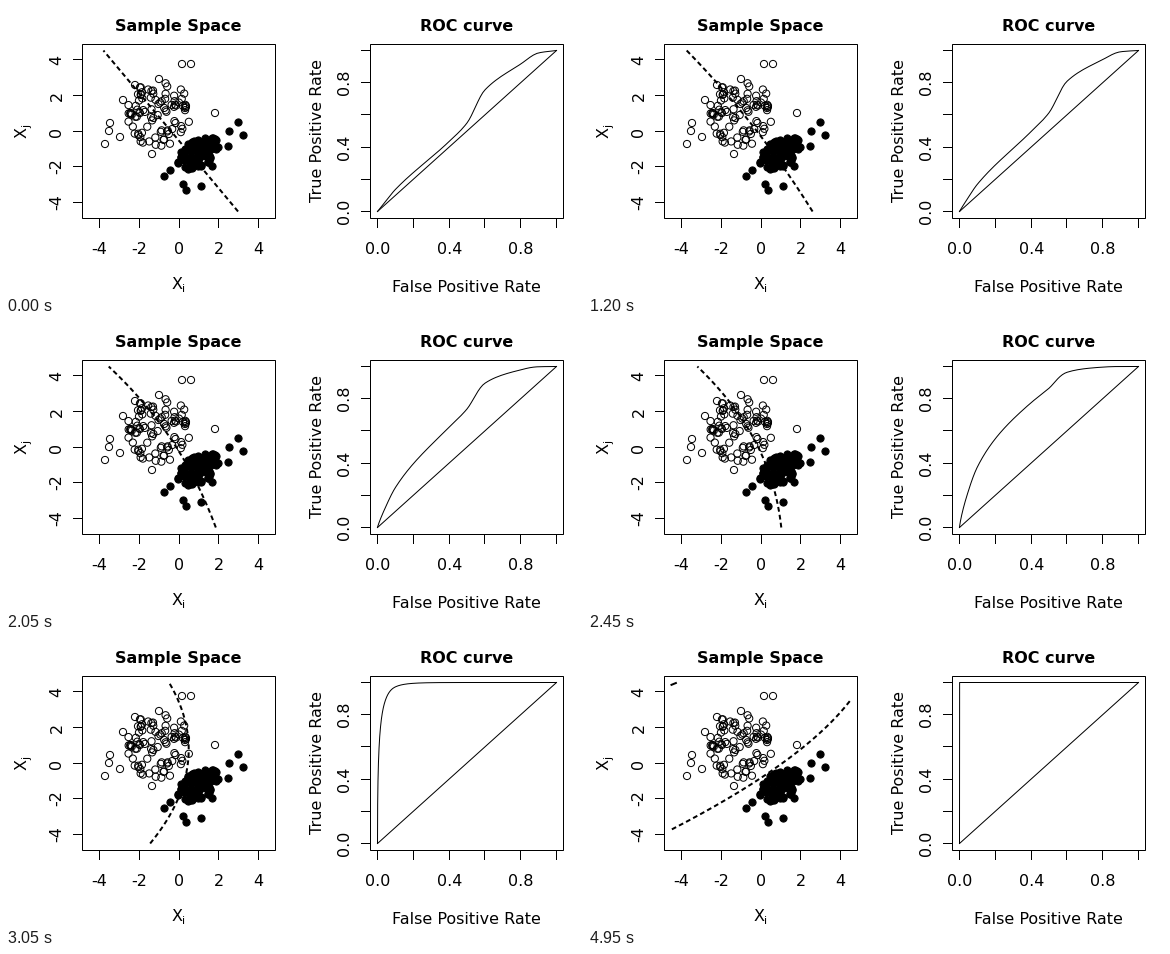
A matplotlib script that plays this animation: 576 by 288 pixels, repeating every 5000 ms.

```python
import numpy as np
import matplotlib
import matplotlib.pyplot as plt
from matplotlib.animation import FuncAnimation
from matplotlib.patches import Rectangle

matplotlib.rcParams["font.family"] = "DejaVu Sans"
matplotlib.rcParams["path.snap"] = False

W, H = 576, 288
FRAMES, STEP = 100, 50
LINE = 19.2                        # height of one margin line
LEFT_A, LEFT_B = 76.5, 364.5       # left edges of the two boxes
TOP, BOX_W, BOX_H = 38.5, 193, 174
PAD_X, PAD_Y = 7, 6                # from a box to its data area
DATA_W, DATA_H = 179, 161
BOTTOM = TOP + BOX_H
LIM = 4.5                          # half-width of the sampled plane


def smooth(x, xs, ys):
    """Monotone cubic interpolation of ys (along axis 0) at x."""
    xs, ys = np.asarray(xs, float), np.asarray(ys, float)
    shape = (-1,) + (1,) * (ys.ndim - 1)
    step = np.diff(xs).reshape(shape)
    sec = np.diff(ys, axis=0) / step
    a, b = sec[:-1], sec[1:]
    same = a * b > 0
    mid = np.where(same, 2 * a * b / np.where(same, a + b, 1), 0)
    slope = np.concatenate([sec[:1], mid, sec[-1:]])
    x = np.clip(np.atleast_1d(x), xs[0], xs[-1])
    i = np.clip(np.searchsorted(xs, x, side="right") - 1, 0, len(xs) - 2)
    h = step[i]
    u = (x - xs[i]).reshape(shape) / h
    return (ys[i] * (1 + 2 * u) * (1 - u) ** 2 + slope[i] * h * u * (1 - u) ** 2
            + ys[i + 1] * u * u * (3 - 2 * u) + slope[i + 1] * h * u * u * (u - 1))


def rates(x, y, left=LEFT_B):
    """False and true positive rate to stage pixels."""
    return (left + PAD_X + DATA_W * np.asarray(x),
            TOP + PAD_Y + DATA_H * (1 - np.asarray(y)))


def plane(x, y):
    """Sample space units to stage pixels."""
    return rates(np.asarray(x) / (2 * LIM) + 0.5,
                 np.asarray(y) / (2 * LIM) + 0.5, LEFT_A)


# The boundary is a cubic x(y) through four heights, eased between key times
HEIGHTS = [-4.5, -1.5, 1.5, 4.5]
EDGE = {
    0: [2.97, 0.72, -1.54, -3.8],
    1.6: [2.4, 0.8, -1.2, -3.7],
    2.45: [1.02, 0.42, -0.92, -3.2],
    3.05: [-1.45, 0.13, 0.45, -0.5],
    3.325: [-4.5, -0.55, 1.55, 1.6],
    3.85: [-5.9, -0.94, 2.74, 4.58],
    4.95: [-5.9, -0.94, 2.78, 5.1],
}
CORNER_TIME = 3.55

# ROC: the starting curve b is bent to 1 - (1 - b^p)^q as the fit improves
START = [(0, 0), (0.04, 0.055), (0.1, 0.137), (0.4, 0.435), (0.5, 0.55),
         (0.6, 0.755), (0.8, 0.916), (0.9, 0.985), (1, 1)]
BEND = {0: (1, 1), 1.6: (0.93, 1.22), 2.45: (0.8, 2.07),
        3.05: (0.5, 7.8), 3.325: (0.1, 200)}

# Outlying points of each class in stage pixels
OPEN_FAR = [(176, 58), (185, 58), (153, 73), (129, 79), (99, 138), (103, 125),
            (104, 117), (114, 131), (117, 94), (146, 148), (188, 138), (209, 107)]
FULL_FAR = [(232, 116), (237, 129), (223, 125), (222, 140), (206, 160),
            (158, 170), (164, 164), (177, 178), (180, 184), (195, 180)]


def cloud(rng, count, centre, radii, tilt=0):
    """Random points filling a sheared ellipse."""
    angle = rng.uniform(0, 2 * np.pi, count)
    r = rng.uniform(0, 1, count) ** 0.55
    u, v = r * np.cos(angle), r * np.sin(angle)
    return np.column_stack([centre[0] + radii[0] * u,
                            centre[1] + radii[1] * v + tilt * u])


fig = plt.figure(figsize=(W / 72, H / 72), dpi=72, facecolor="white")
ax = fig.add_axes([0, 0, 1, 1])
ax.set_xlim(0, W)
ax.set_ylim(H, 0)
ax.axis("off")


def label(x, y, text, turn=0, size=16, weight="normal"):
    ax.text(x, y, text, size=size, weight=weight, rotation=turn,
            ha="center", va="baseline", rotation_mode="anchor")


def panel(left, title, to_px, ticks, names):
    ax.add_patch(Rectangle((left, TOP), BOX_W, BOX_H, fill=False, lw=1))
    label(left + BOX_W / 2 - 0.3, 25, title, weight="bold")
    for tick in ticks:
        x, y = np.floor(to_px(tick, tick)) + 0.5
        ax.plot([x, x], [BOTTOM, BOTTOM + 9], "k", lw=1)
        ax.plot([left - 9, left], [y, y], "k", lw=1)
        if tick in names:
            label(x, 248, names[tick])
            label(left - 1.1 * LINE, y, names[tick], 90)


panel(LEFT_A, "Sample Space", plane, [-4, -2, 0, 2, 4],
      {v: str(v) for v in (-4, -2, 0, 2, 4)})
panel(LEFT_B, "ROC curve", rates, [0, 0.2, 0.4, 0.6, 0.8, 1],
      {v: f"{v:.1f}" for v in (0, 0.4, 0.8)})

label(171.2, 283, "X")
label(177.8, 286, "i", size=11.2)
label(21, 127, "X", 90)
label(24, 120, "j", 90, size=11.2)
label(460.7, 286, "False Positive Rate")
label(315.5, 125, "True Positive Rate", 90)

rng = np.random.default_rng(4)
open_pts = np.vstack([OPEN_FAR, cloud(rng, 88, (153, 107), (32, 35))])
full_pts = np.vstack([FULL_FAR, cloud(rng, 90, (192, 147), (21, 15), -8)])
for pts, face in ((open_pts, "none"), (full_pts, "black")):
    ax.scatter(*pts.T, s=7.2 ** 2, facecolors=face, edgecolors="black", lw=1)

ax.plot(*rates([0, 1], [0, 1]), "k", lw=1)
roc_line, = ax.plot([], [], "k", lw=1)
edge_line, = ax.plot([], [], "k", lw=2, ls=(0, (2.4, 1.6)),
                     dash_capstyle="butt")
corner, = ax.plot(*plane([-4.5, -4.28], [4.37, 4.47]), "k", lw=2)

heights = np.linspace(-LIM, LIM, 240)
fpr = np.append(0, np.geomspace(1e-4, 1, 400))
start = np.clip(smooth(fpr, *zip(*START)), 0, 1)


def draw(frame):
    t = frame * STEP / 1000
    knots = smooth(t, list(EDGE), list(EDGE.values()))[0]
    x = np.polyval(np.polyfit(HEIGHTS, knots, 3), heights)
    inside = np.abs(x) <= LIM
    edge_line.set_data(*plane(x[inside], heights[inside]))
    corner.set_visible(t >= CORNER_TIME)
    p, q = np.exp(smooth(t, list(BEND), np.log(list(BEND.values())))[0])
    roc_line.set_data(*rates(fpr, 1 - (1 - start ** p) ** q))
    return edge_line, corner, roc_line


anim = FuncAnimation(fig, draw, frames=FRAMES, interval=STEP,
                     repeat=True, repeat_delay=0)
plt.show()
```
